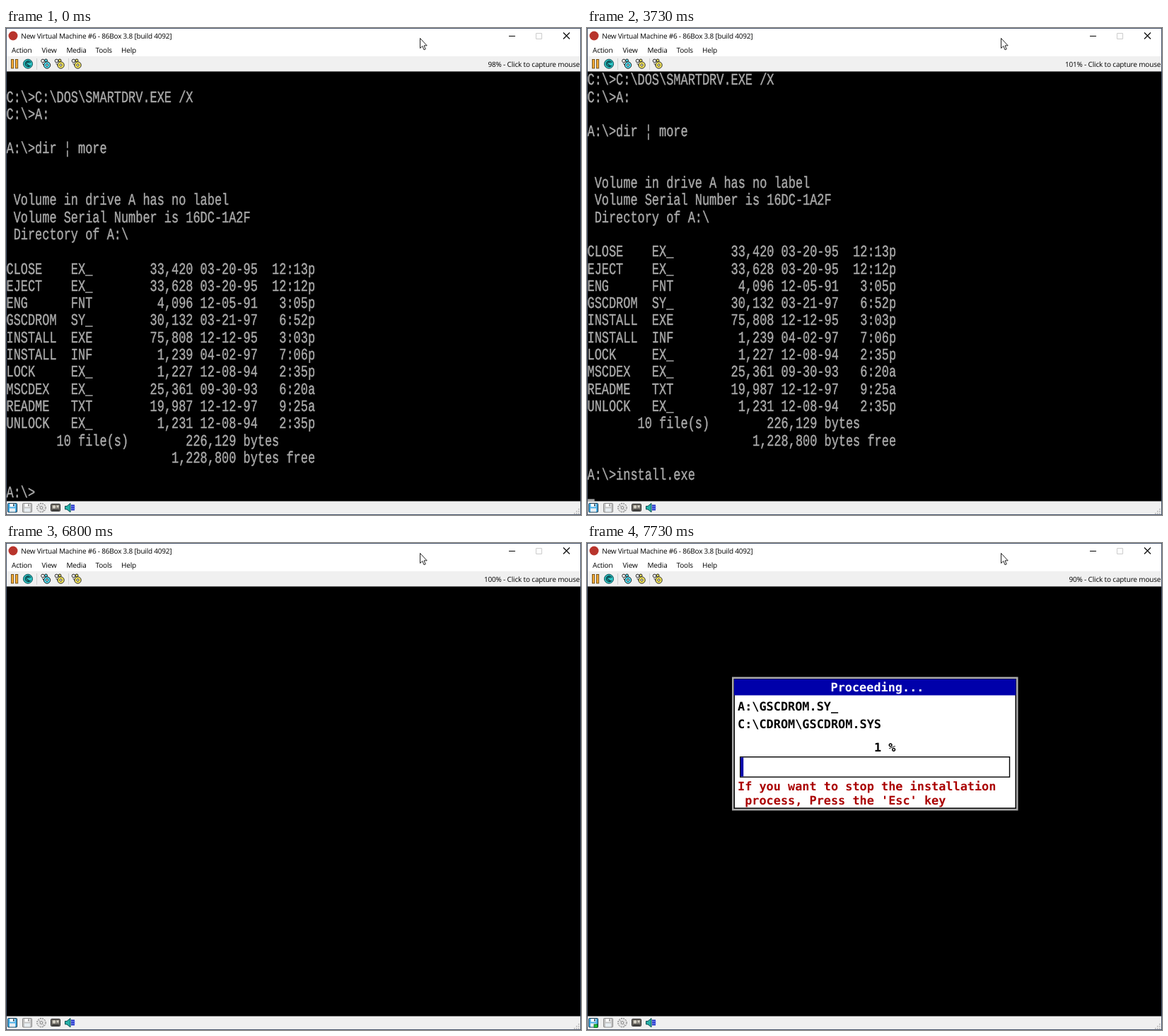
Animation of 813x689 px, one loop 8000 ms. Source, as an HTML page:

```html
<!DOCTYPE html>
<html lang="en">
<head>
<meta charset="utf-8">
<title>Virtual machine</title>
<style>
html, body { margin: 0; width: 100%; height: 100%; overflow: hidden; background: #000; }
svg { display: block; }
text { white-space: pre; text-rendering: geometricPrecision; }
.ui { font: 10px "Open Sans", "Noto Sans", sans-serif; letter-spacing: -.16px; fill: #000; }
.dos { font: 15px "Liberation Mono", monospace; fill: #aaa; stroke: #aaa; stroke-width: .3; }
.vga { font: bold 16.87px "DejaVu Sans Mono", monospace; }
</style>
</head>
<body>
<svg id="stage" width="813" height="689" viewBox="0 0 813 689" xmlns="http://www.w3.org/2000/svg"></svg>
<script>
const LOOP = 8000;
const COMMAND = "install.exe";
const TYPE_START = 1280, TYPE_STEP = 147;
const SCROLL = 3070, CLEAR = 6470;
const LOADS = [[0, 98], [400, 99], [2400, 100], [3400, 101], [4400, 99], [5400, 100], [7400, 90]];

const rect = (x, y, w, h, fill, more = "") =>
  `<rect x="${x}" y="${y}" width="${w}" height="${h}" fill="${fill}" ${more}/>`;
const disc = (x, y, r, fill, more = "") => `<circle cx="${x}" cy="${y}" r="${r}" fill="${fill}" ${more}/>`;
const path = (d, stroke, width = 1, fill = "none") =>
  `<path d="${d}" stroke="${stroke}" stroke-width="${width}" fill="${fill}"/>`;
const text = (cls, x, y, s, more = "") =>
  `<text class="${cls}" x="${x}" y="${y}" ${more}>${s.replace(/>/g, "&gt;")}</text>`;
const vga = (x, y, s, fill = "#000") => text("vga", x, y, s, `fill="${fill}"`);

// Text mode: 80 x 25 cells of 9 x 16, scaled to the window.
const entry = (name, ext, size, date, time) =>
  name.padEnd(9) + ext.padEnd(3) + size.padStart(14) + " " + date + time.padStart(8);

const rows = [
  "",
  String.raw`C:\>C:\DOS\SMARTDRV.EXE /X`,
  String.raw`C:\>A:`,
  "",
  String.raw`A:\>dir ¦ more`,
  "", "",
  " Volume in drive A has no label",
  " Volume Serial Number is 16DC-1A2F",
  " Directory of A:\\",
  "",
  entry("CLOSE", "EX_", "33,420", "03-20-95", "12:13p"),
  entry("EJECT", "EX_", "33,628", "03-20-95", "12:12p"),
  entry("ENG", "FNT", "4,096", "12-05-91", "3:05p"),
  entry("GSCDROM", "SY_", "30,132", "03-21-97", "6:52p"),
  entry("INSTALL", "EXE", "75,808", "12-12-95", "3:03p"),
  entry("INSTALL", "INF", "1,239", "04-02-97", "7:06p"),
  entry("LOCK", "EX_", "1,227", "12-08-94", "2:35p"),
  entry("MSCDEX", "EX_", "25,361", "09-30-93", "6:20a"),
  entry("README", "TXT", "19,987", "12-12-97", "9:25a"),
  entry("UNLOCK", "EX_", "1,231", "12-08-94", "2:35p"),
  " ".repeat(7) + "10 file(s)" + " ".repeat(8) + "226,129 bytes",
  " ".repeat(23) + "1,228,800 bytes free",
  ""
];

function terminal() {
  const lines = rows.map((s, i) => s && text("dos", 0, i * 16 + 12, s)).join("");
  return `<g id="term" transform="translate(.5 62) scale(1.1278 1.519)">
    <g id="lines">${lines}<text id="prompt" class="dos" x="0" y="396"></text></g>
    ${rect(0, 397.9, 9, 2.1, "#aaa", 'id="caret"')}</g>`;
}

// Graphics mode dialogs
function dialog(id, x, y, w, h, titleX, title, body) {
  return `<g id="${id}">` +
    rect(x, y, w, h, "#aaa") +
    rect(x + 2.5, y + 2.5, w - 5, h - 5, "#000") +
    rect(x + 4, y + 4, w - 8, h - 8, "#fff") +
    rect(x + 3, y + 3, w - 6, 23, "#0000aa") +
    vga(titleX, y + 20, title, "#fff") + body + "</g>";
}

function button(x, y, w, h, edge, labelX, label) {
  const l = x + edge, t = y + edge, r = x + w - edge, b = y + h - edge;
  return rect(x, y, w, h, "#000") +
    rect(l, t, r - l, b - t, "#aaa") +
    path(`M${l + 1} ${b - 1}V${t + 1}H${r - 1}`, "#fff", 2) +
    path(`M${l + 1} ${b - 1}H${r - 1}V${t + 1}`, "#555", 2) +
    vga(labelX, y + 20, label);
}

const field = (x, y, w, h) => rect(x, y, w, h, "#fff", 'stroke="#000" stroke-width="1.4"');

const dialogs =
  dialog("ask", 230, 189.5, 357, 144.5, 304.5, "Directory Information",
    vga(244, 242, "Installed Directory") +
    field(241.7, 251.7, 203.6, 26) +
    vga(243.5, 270, "C:\\CDROM") +
    button(483.5, 225, 85.5, 32, 2.6, 517.3, "OK") +
    button(484.8, 264, 83, 29.5, 1.4, 497, "CANCEL")) +
  dialog("copy", 205, 189.5, 404.5, 189, 344.5, "Proceeding...",
    vga(213, 237, "A:\\GSCDROM.SY_") +
    vga(213, 262, "C:\\CDROM\\GSCDROM.SYS") +
    `<text id="done" class="vga" x="406" y="295"></text>` +
    field(216.7, 302.7, 380.8, 28.4) +
    rect(217.2, 303.4, 4, 27, "#0000aa", 'id="bar"') +
    vga(213, 350, "If you want to stop the installation", "#aa0000") +
    vga(213, 370, " process, Press the 'Esc' key", "#aa0000"));

// Window frame, toolbar and status bar
function bubbles(x, fill) {
  const ink = 'stroke="#222"';
  return disc(x - 4, 46.5, 2.3, "#fff", ink) + disc(x + .5, 46, 2, fill, ink) +
    disc(x + 2, 52.5, 4.7, fill, ink) + disc(x + 2, 52.5, 1.6, "#fff", ink) +
    path(`M${x - 5} 50l3 3`, "#222");
}

function floppy(x, fill, ink) {
  return rect(x + .5, 672.5, 13, 12.5, fill, `stroke="${ink}" rx="1"`) +
    rect(x + 3.5, 673, 7, 4.5, "#fff") + rect(x + 8, 673.5, 1.6, 3, ink) +
    rect(x + 3, 679.5, 8, 5, "#e8eef2");
}

const grip = [0, 1, 2].map(r => [0, 1, 2].filter(c => c + r > 1)
  .map(c => rect(803 + c * 3, 680 + r * 3, 1.6, 1.6, "#b4b4b4")).join("")).join("");

const frame =
  rect(0, 0, 813, 40, "#fff") + rect(0, 40, 813, 21.5, "#f0f0f0") + rect(0, 669.5, 813, 19.5, "#f0f0f0") +
  rect(.5, .5, 812, 688, "none", 'stroke="#46536a"') +
  disc(10, 11, 6.5, "#b8342c") +
  text("ui", 21.3, 14.5, "New Virtual Machine #6 - 86Box 3.8 [build 4092]", 'style="letter-spacing:-.21px"') +
  [[8, "Action"], [50.5, "View"], [85.5, "Media"], [126.5, "Tools"], [163, "Help"]]
    .map(([x, s]) => text("ui", x, 34.5, s)).join("") +
  path("M711 11.5H720", "#000") +
  path("M749.5 7.5H757.5V15.5H749.5Z", "#ccc") +
  path("M788 6.5L797 15.5M797 6.5L788 15.5", "#000", 1.1) +
  [7, 13].map(x => rect(x + .5, 44.5, 3.2, 12.5, "#f5ab35", 'stroke="#6b4a12" stroke-width=".9"')).join("") +
  disc(31, 50.7, 6.5, "#2fc5c5", 'stroke="#0b4a50"') +
  path("M35 49A4 4 0 1 0 34 53.5H30.5M33 49.5A2 2 0 1 0 32 52", "#07383e", 1.2) +
  bubbles(56, "#4fd5e8") + bubbles(75.5, "#f3e45c") + bubbles(99.5, "#f3e45c") +
  path("M43.5 43V59M88.5 43V59", "#d0d0d0") +
  `<text id="load" class="ui" x="811.3" y="54.5" text-anchor="end"></text>` +
  floppy(2, "#48aee6", "#12354d") +
  rect(10, 681, 5, 4.5, "#20c840", 'id="led" stroke="#0a5a18" stroke-width=".8"') +
  floppy(23, "#c4c4c4", "#8a8a8a") +
  disc(50, 678.7, 6.2, "#e2e2e2", 'stroke="#666" stroke-dasharray="2 1.3"') +
  disc(50, 678.7, 1.8, "#fff", 'stroke="#777"') + path("M46 675l2 2M52 681l2 2", "#999") +
  rect(63.5, 673.5, 13, 10, "#77736c", 'stroke="#222" rx="1"') +
  disc(68, 677.5, 2.2, "#d8d4c8") + rect(71.5, 675.5, 3, 3, "#d8d4c8") + rect(65, 681, 10, 1.5, "#333") +
  path("M83.5 676.5H86L91 672.5V685L86 681H83.5Z", "#0b4a50", 1, "#25b0a8") +
  rect(92, 674.5, 5, 8, "#2434c8") + path("M92 677H98M92 680H98", "#8fa0ff") +
  grip +
  path("M585.5 14.5V28.6L588.8 25.6L591 30.8L593.2 29.9L591 24.9H595.2Z", "#222", 1, "#fff");

document.getElementById("stage").innerHTML =
  rect(0, 0, 813, 689, "#000") + terminal() + dialogs + frame;

const el = {};
for (const id of ["term", "lines", "prompt", "caret", "ask", "copy", "done", "bar", "load", "led"])
  el[id] = document.getElementById(id);
const show = (node, on) => node.setAttribute("visibility", on ? "visible" : "hidden");
const within = (t, a, b) => t >= a && t < b;

// Blink period in ticks of 1/15 s, about 460 ms.
function blinkOn(t) {
  const tick = Math.floor((t + 5) * 15 / 1000);
  return (tick - .25 + 6.92) % 6.92 < 3.2;
}

function draw(t) {
  const typed = Math.max(0, Math.min(COMMAND.length, Math.floor((t - TYPE_START) / TYPE_STEP) + 1));
  const scrolled = t >= SCROLL;
  const textMode = t < CLEAR;

  show(el.term, textMode);
  el.lines.setAttribute("transform", `translate(0 ${scrolled ? -16 : 0})`);
  el.prompt.textContent = "A:\\>" + COMMAND.slice(0, typed);
  el.caret.setAttribute("x", scrolled ? 0 : (4 + typed) * 9);
  show(el.caret, textMode && blinkOn(t));

  const copied = t >= 7730;
  show(el.ask, within(t, 6865, 7600));
  show(el.copy, t >= 7665);
  show(el.bar, copied);
  el.done.textContent = (copied ? 1 : 0) + " %";

  const load = LOADS.filter(([at]) => t >= at).pop()[1];
  el.load.textContent = load + "% - Click to capture mouse";
  show(el.led, within(t, 3800, 6800) || t >= 7600);
}

const start = performance.now();
function tick() {
  draw((performance.now() - start) % LOOP);
  requestAnimationFrame(tick);
}
draw(0);
requestAnimationFrame(tick);
</script>
</body>
</html>
```
